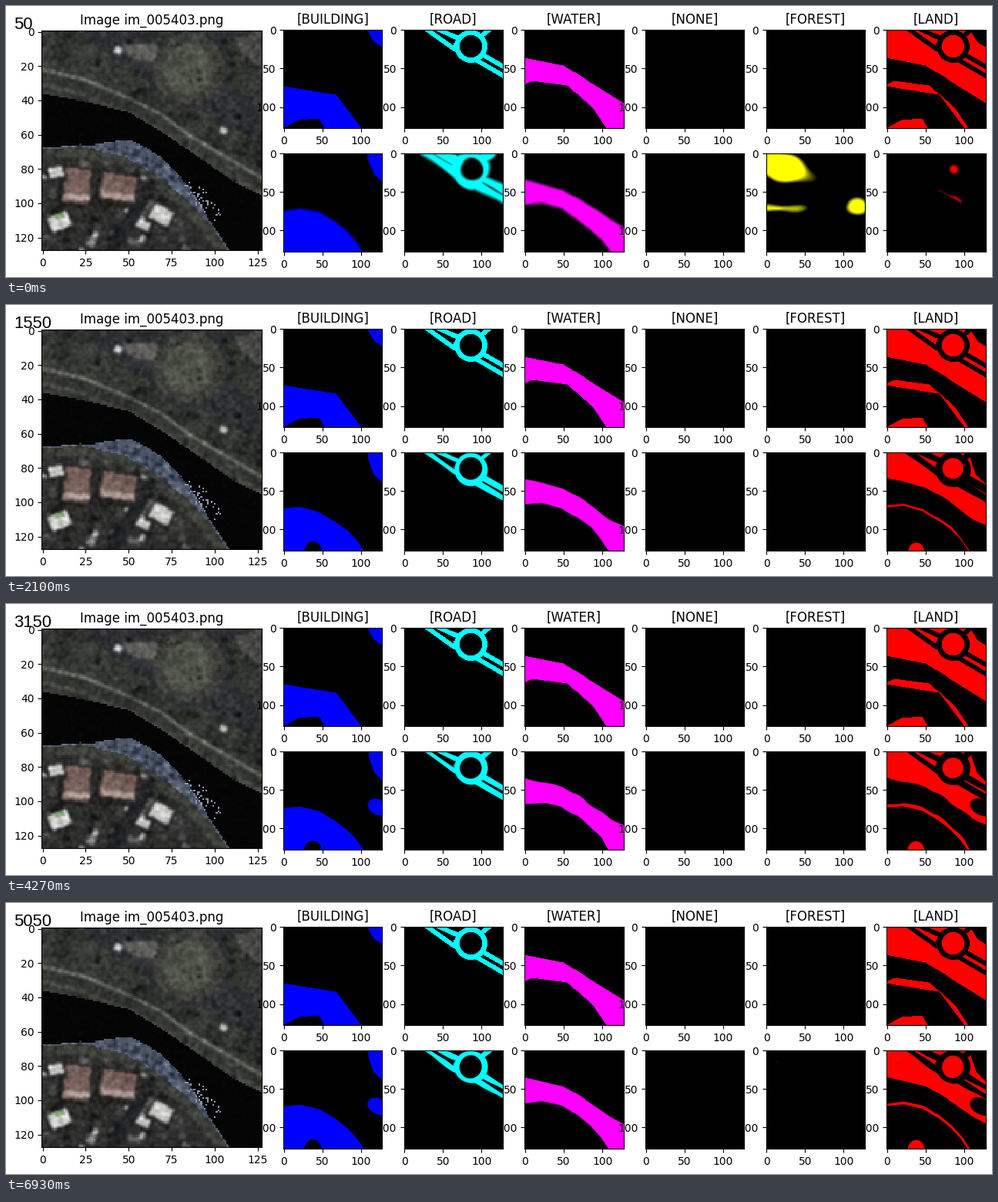
A matplotlib script that plays this animation: 1280 by 353 pixels, repeating every 7000 ms.

```python
import numpy as np
import matplotlib.pyplot as plt
from matplotlib.animation import FuncAnimation
from matplotlib.path import Path

W, H, DPI = 1280, 353, 100
N = 128
FRAMES, INTERVAL = 100, 70
COLORS = {"BUILDING": (0, 0, 1), "ROAD": (0, 1, 1), "WATER": (1, 0, 1),
          "NONE": (0, 0, 0), "FOREST": (1, 1, 0), "LAND": (1, 0, 0)}

plt.rcParams["font.family"] = "DejaVu Sans"
yy, xx = np.mgrid[:N, :N].astype(float)
grid = np.column_stack([xx.ravel(), yy.ravel()])


# ---------- geometry: signed distances, negative inside ----------
def inside(*pts):
    return Path(pts).contains_points(grid).reshape(N, N)


def segment(a, b):
    (ax, ay), (bx, by) = a, b
    dx, dy = bx - ax, by - ay
    t = np.clip(((xx - ax) * dx + (yy - ay) * dy) / (dx * dx + dy * dy), 0, 1)
    return np.hypot(xx - ax - t * dx, yy - ay - t * dy)


def polygon(*pts):
    d = np.minimum.reduce([segment(a, b) for a, b in zip(pts, pts[1:] + pts[:1])])
    return np.where(inside(*pts), -d, d)


def oval(x, y, rx, ry, deg=0):
    a = np.radians(deg)
    u = (xx - x) * np.cos(a) + (yy - y) * np.sin(a)
    v = (yy - y) * np.cos(a) - (xx - x) * np.sin(a)
    return (np.hypot(u / rx, v / ry) - 1) * min(rx, ry)


def box(x, y, w, h, deg):
    a = np.radians(deg)
    u = (xx - x) * np.cos(a) + (yy - y) * np.sin(a)
    v = (yy - y) * np.cos(a) - (xx - x) * np.sin(a)
    return (abs(u) < w / 2) & (abs(v) < h / 2)


# River banks: everything below each line is inside
south_of = lambda *pts: polygon((-30, pts[0][1]), *pts, (pts[-1][0] + 20, 160), (-30, 160))
UPPER = south_of((0, 36), (25, 41), (50, 47), (70, 59), (90, 73), (110, 87), (130, 97), (160, 112))
LOWER = south_of((0, 68), (22, 66), (48, 72), (66, 83), (84, 97), (98, 112), (110, 130))
RIVER = np.maximum(UPPER, -LOWER)

# Roundabout with its arms
RADIUS = np.hypot(xx - 85, yy - 22)
ARMS = np.minimum.reduce([
    segment((26, -2), (72, 31)), segment((40, -2), (72, 13)), segment((74, 34), (94, 41)),
    segment((94, 41), (130, 62)), segment((102, 34), (130, 50)), segment((98, 9), (113, -3))])
ROAD = np.minimum(abs(RADIUS - 18) - 3.4, ARMS - 3)
ROAD = np.maximum(ROAD, 14.6 - RADIUS)

CORNER = polygon((108, -20), (109, 8), (116, 28), (128, 40), (150, 50), (150, -20))
YARD = oval(38, 129, 12, 14)
ANNEX = oval(122, 73, 14, 9, 25)
GROVE = oval(14, 16, 46, 18, 18)
HEDGES = np.minimum(oval(15, 71, 22, 4), oval(119, 70, 13, 10))


# ---------- reference masks ----------
def truth():
    building = (inside((-1, 73), (67, 84), (101, 129), (54, 129), (46, 115), (19, 117), (-1, 128))
                | inside((106, -1), (117, 17), (129, 24), (129, -1)))
    road = ROAD < 0
    water = inside((-1, 37), (50, 47), (129, 96), (129, 129), (106, 129),
                   (88, 102), (55, 72), (10, 66), (-1, 71)) & ~building
    none = np.zeros((N, N), bool)
    return [building, road, water, none, none, ~(building | road | water)]


# ---------- predictions ----------
def predict(i):
    """The outlines start coarse and soft, then settle on the map with a small wobble."""
    early = np.exp(-i / 12)
    late = np.clip((i - 40) / 20, 0, 1)
    pulse = np.cos(2 * np.pi * i / 23) * np.exp(-i / 40)
    rng = np.random.default_rng(i)

    def wobble():
        (kx, ky), phase = rng.uniform(-0.13, 0.13, 2), rng.uniform(0, 2 * np.pi)
        return (0.7 + early) * np.sin(kx * xx + ky * yy + phase)

    building = np.minimum.reduce([LOWER + 5, CORNER, ANNEX + 12 * (1 - late)])
    building = np.maximum(building, -YARD - 14 * early) + wobble()
    road = np.where(RADIUS < 17, ROAD, ROAD - 3 * early) + wobble()
    water = RIVER + wobble()
    forest = np.minimum(GROVE + 18 * (1 - pulse), HEDGES + 12 * (1 - early)) + wobble()
    taken = np.minimum.reduce([building, road, water, forest])
    land = 0.5 + 9 * early - taken
    none = np.full((N, N), 9.0)
    soft = 1.2 + 3 * early
    return [np.clip(0.5 - f / soft, 0, 1) for f in (building, road, water, none, forest, land)]


# ---------- aerial picture ----------
def blur(a):
    for axis in (0, 1):
        a = (np.roll(a, 1, axis) + 2 * a + np.roll(a, -1, axis)) / 4
    return a


def aerial():
    rng = np.random.default_rng(4)
    grain = 2 * blur(rng.normal(0, 1, (N, N)))
    patches = rng.normal(0, 1, (N, N))
    for _ in range(20):
        patches = blur(patches)
    img = np.empty((N, N, 3))
    img[:] = (50, 53, 48)
    img += 60 * patches[..., None]

    img[ROAD < 2] = (46, 48, 51)
    img[inside((46, 7), (66, 8), (73, 17), (62, 18), (50, 14))] = (96, 95, 92)
    img[inside((112, 4), (128, 0), (128, 20), (118, 18))] = (74, 74, 73)
    angle = np.arctan2(yy - 22, xx - 84)
    rays = (RADIUS < 21) & (RADIUS > 14)
    img[rays] = (62 + 10 * np.sin(36 * angle[rays]))[:, None] * (0.98, 1, 0.92)
    img[RADIUS <= 14.5] = (78, 82, 72)

    for x, y in rng.uniform(0, N, (70, 2)):
        if np.hypot(x - 84, y - 22) > 23:
            img[oval(x, y, *rng.uniform(1, 3, 2)) < 0] = (26, 29, 26)

    walk = np.interp(xx, [0, 24, 46, 68, 86, 128], [22, 28, 37, 48, 61, 86])
    img[abs(yy - walk) < 0.9] = (122, 121, 115)
    img[abs(yy - walk - 9) < 0.8] = (72, 73, 67)

    # Town: small seeded roofs, then the large ones
    town = LOWER < -5
    img[town] = (46, 46, 45)
    img[(LOWER < -1) & (LOWER > -7)] = (62, 64, 58)
    for x, y in rng.uniform((0, 74), (88, 128), (90, 2)):
        tone = rng.choice([24, 34, 62, 95, 175])
        img[box(x, y, *rng.uniform(2, 6, 2), 28) & town] = tone
    for x, y, w, h, deg in [(20, 90, 15, 20, 5), (44, 91, 20, 15, 10)]:
        img[box(x - 1, y + 1, w + 5, h + 4, deg)] = (34, 34, 33)
        img[box(x, y, w, h, deg)] = (118, 96, 90)
        img[box(x, y + h / 3, w, 3, deg)] = (176, 160, 152)
    for x, y, w, h, deg in [(8, 82, 8, 6, -8), (10, 111, 12, 9, -25),
                            (59, 112, 8, 7, 28), (69, 107, 12, 9, 28)]:
        img[box(x, y + 1, w + 4, h + 4, deg)] = (38, 38, 38)
        img[box(x, y, w, h, deg)] = (205, 205, 203)
    img[box(10, 108, 5, 2, -25)] = (110, 160, 95)
    img[inside((62, 86), (68, 88), (47, 124), (40, 128), (36, 128))] = (34, 35, 37)
    img[box(44, 11, 4, 4, 20) | box(105, 58, 4, 3, 30)] = 205
    img = blur(img) + grain[..., None] * (5 + 0.07 * img)

    river = RIVER < 0
    img[river] = 4 + 2 * abs(grain[river])[:, None]
    quay = (LOWER > -1) & (LOWER < 10 * np.sin(np.pi * np.clip((xx - 26) / 72, 0, 1)))
    img[quay] = np.array((74, 83, 100)) + 20 * grain[quay][:, None]
    spray = (oval(92, 98, 16, 5, 48) < 0) & (rng.random((N, N)) > 0.85)
    img[spray] = (140, 150, 168)
    return np.clip(img, 0, 255).astype(np.uint8)


# ---------- figure ----------
fig = plt.figure(figsize=(W / DPI, H / DPI), dpi=DPI, facecolor="white")
LEFT, STEP, CELL = 46.8, 156.65, 128.3
ROWS = (30.8, 191.6)


def panel(x, y, size, data, xstep, ystep, title=""):
    ax = fig.add_axes([x / W, 1 - (y + size) / H, size / W, size / H])
    im = ax.imshow(data, interpolation="nearest", aspect="auto")
    ax.set_xticks(range(0, N, xstep))
    ax.set_yticks(range(0, N, ystep))
    ax.set_title(title, fontsize=12)
    return im


panel(LEFT - 0.4, 32.4, 286, aerial(), 25, 20, "Image im_005403.png")
outputs = []
for c, (mask, (name, color)) in enumerate(zip(truth(), COLORS.items())):
    x = LEFT + (c + 2) * STEP
    panel(x, ROWS[0], CELL, mask[..., None] * np.array(color, float), 50, 50, f"[{name}]")
    outputs.append(panel(x, ROWS[1], CELL, np.zeros((N, N, 3)), 50, 50))

counter = fig.text(10 / W, 1 - 30.5 / H, "", family="Liberation Sans", fontsize=22 * 72 / DPI)


def update(i):
    for im, level, color in zip(outputs, predict(i), COLORS.values()):
        im.set_data(level[..., None] * np.array(color, float))
    counter.set_text(str(50 * (i + 1 + (i > 30))))
    return [*outputs, counter]


anim = FuncAnimation(fig, update, frames=FRAMES, interval=INTERVAL, repeat=True, repeat_delay=0)
plt.show()
```
